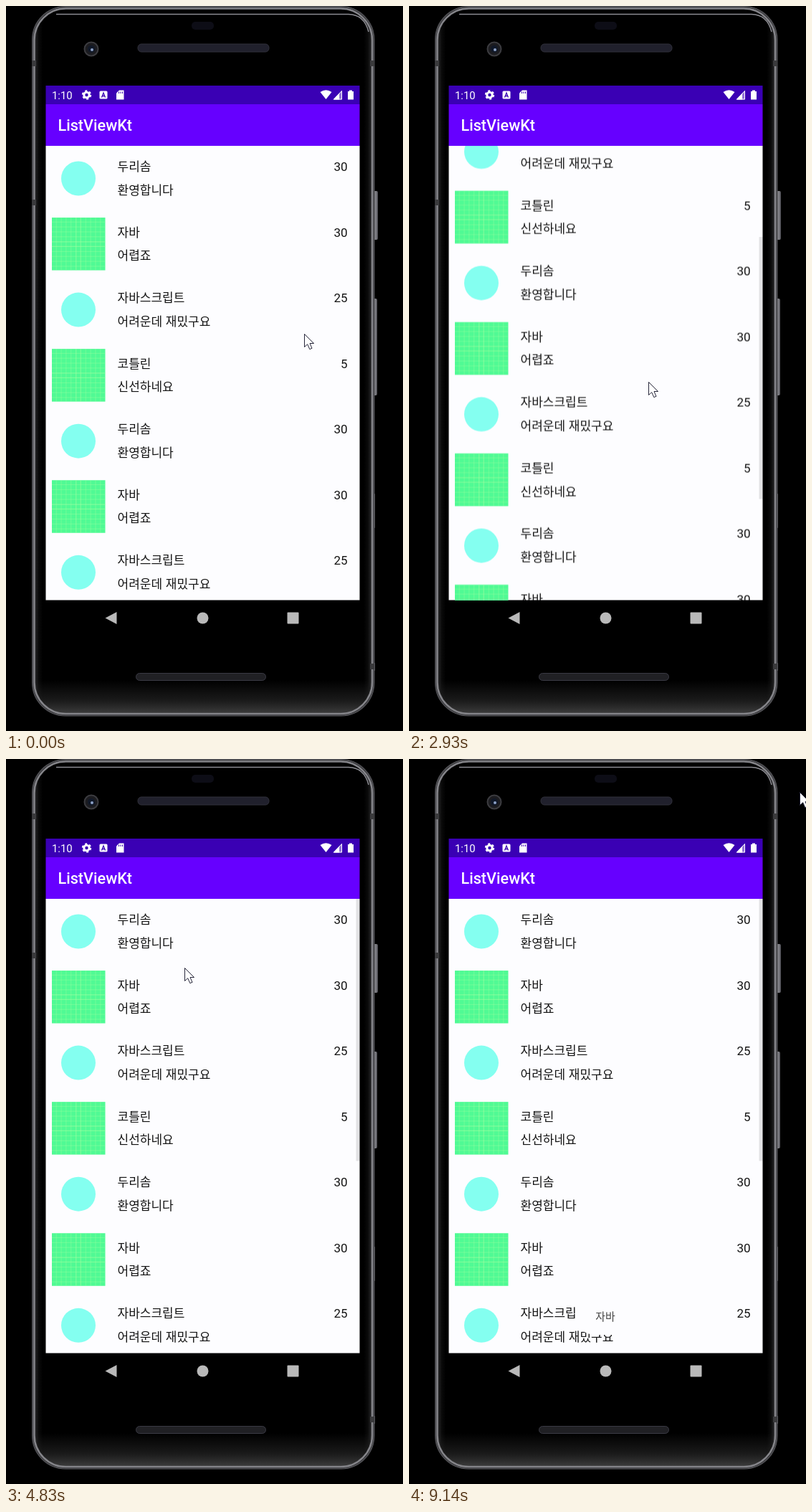
Write an HTML page that moves like this. It is 554 px wide and 1011 px high and loops after 9.27 s.

```html
<!DOCTYPE html>
<html lang="ko">
<head>
<meta charset="utf-8">
<title>ListViewKt</title>
<style>
html, body { margin: 0; width: 100%; height: 100%; overflow: hidden; background: #000; }
svg { display: block; width: 100vw; height: 100vh; }
text { font-family: Roboto, "Noto Sans CJK KR", "Noto Sans CJK", sans-serif; font-size: 17px; fill: #141414; }
.ko { font-family: "Noto Sans CJK KR", "Noto Sans CJK", sans-serif; }
.num { text-anchor: end; }
.title { font-size: 21.6px; font-weight: 500; fill: #fff; }
.clock { font-size: 14.9px; fill: #fff; }
.toast text { font-size: 14.9px; fill: #444; text-anchor: middle; }
.toast rect { fill: #fdfdff; }

#list, #thumb, #bar, #glow, #cursor, .toast { animation: 9270ms linear infinite; }
#list { animation-name: scroll; }
#thumb { animation-name: thumb; }
#bar { animation-name: bar; }
#glow { animation-name: glow; }
#cursor { animation-name: cursor; }
#toast1 { animation-name: toast1; }
#toast2 { animation-name: toast2; }

@keyframes scroll {
  0%, 26.43% { transform: translateY(0); animation-timing-function: ease-in; }
  31.61% { transform: translateY(-220px); animation-timing-function: ease-out; }
  38.83%, 42.61% { transform: translateY(-465px); animation-timing-function: ease-in-out; }
  50.16%, 100% { transform: translateY(0); }
}
@keyframes thumb {
  0%, 26.43% { transform: translateY(0); animation-timing-function: ease-in; }
  31.61% { transform: translateY(126.8px); animation-timing-function: ease-out; }
  38.83%, 42.61% { transform: translateY(268px); animation-timing-function: ease-in-out; }
  50.16%, 100% { transform: translateY(0); }
}
@keyframes bar {
  0%, 26.43% { opacity: 0; }
  27%, 100% { opacity: 1; }
}
@keyframes glow {
  0%, 38.3% { opacity: 0; }
  39.91%, 41.6% { opacity: 1; }
  43.15%, 100% { opacity: 0; }
}
@keyframes toast1 {
  0%, 57.61% { opacity: 0; }
  60.41%, 79.83% { opacity: 1; }
  81.98%, 100% { opacity: 0; }
}
@keyframes toast2 {
  0%, 82.74% { opacity: 0; }
  85.22%, 100% { opacity: 1; }
}
@keyframes cursor {
  0%, .32% { transform: translate(416px, 457px); }
  10.03% { transform: translate(345px, 473px); }
  18.02%, 20.5% { transform: translate(324px, 476px); }
  30%, 31.9% { transform: translate(334px, 524px); }
  40.5%, 41.6% { transform: translate(274px, 375.5px); }
  51.8%, 52.3% { transform: translate(249px, 291px); }
  55.77%, 57.61% { transform: translate(248px, 262px); }
  66.24%, 92.4% { transform: translate(275px, 332px); }
  93.53%, 95.69% { transform: translate(296px, 398px); animation-timing-function: ease-in; }
  98.6%, 100% { transform: translate(545px, 46px); }
}
</style>
</head>
<body>
<svg viewBox="0 0 554 1011" preserveAspectRatio="none">
  <defs>
    <linearGradient id="side" x1="0" x2="1" y1="0" y2="0">
      <stop offset="0" stop-color="#3a3a3c"/>
      <stop offset=".018" stop-color="#0a0a0a"/>
      <stop offset=".03" stop-color="#000"/>
      <stop offset=".97" stop-color="#000"/>
      <stop offset=".982" stop-color="#0a0a0a"/>
      <stop offset="1" stop-color="#3a3a3c"/>
    </linearGradient>
    <linearGradient id="chin" x1="0" x2="0" y1="0" y2="1">
      <stop offset="0" stop-color="#2a2a2a" stop-opacity="0"/>
      <stop offset=".6" stop-color="#2a2a2a" stop-opacity=".6"/>
      <stop offset="1" stop-color="#3c3c3c"/>
    </linearGradient>
    <linearGradient id="key" x1="0" x2="1" y1="0" y2="0">
      <stop offset="0" stop-color="#2a2a2e"/>
      <stop offset=".6" stop-color="#8a8a90"/>
      <stop offset="1" stop-color="#4a4a50"/>
    </linearGradient>
    <clipPath id="view"><rect x="55.5" y="195" width="438" height="633.5"/></clipPath>
    <g id="tile">
      <rect x="64" y="8.5" width="74.5" height="73.5" fill="#50fa94"/>
      <path id="grid" fill="none" stroke="#a8ffa0" stroke-opacity=".35"/>
    </g>
    <circle id="dot" cx="101" cy="45.5" r="24" fill="#84fff0"/>
  </defs>

  <rect width="554" height="1011" fill="#000"/>

  <!-- phone body -->
  <g fill="url(#key)">
    <rect x="511" y="258" width="8" height="68" rx="2"/>
    <rect x="511" y="408" width="7" height="135" rx="2"/>
    <rect x="511" y="680" width="4" height="48" rx="1"/>
    <rect x="511" y="916" width="4" height="11" rx="1"/>
  </g>
  <rect x="37" y="1" width="476.500" height="988.500" rx="46" fill="url(#side)" stroke="#4e4e52" stroke-width="2"/>
  <path d="M41 940H509V946Q509 986 466 986H84Q41 986 41 946z" fill="url(#chin)"/>
  <rect x="39.500" y="3.500" width="471.500" height="983.500" rx="44" fill="none" stroke="#85858a" stroke-width="2.500"/>
  <path d="M70 11.500H478Q500 12 506 36" fill="none" stroke="#8c8c92" stroke-width="1.500"/>
  <path d="M36 80h6M36 274h6M508 80h6M508 921h6" stroke="#3a3a3c" stroke-width="8"/>
  <rect x="184" y="53" width="183" height="11" rx="5" fill="#20202c" stroke="#30303a"/>
  <rect x="181.500" y="930.500" width="181" height="10" rx="5" fill="#202024" stroke="#3a3a44"/>
  <rect x="259" y="22" width="31" height="11" rx="5" fill="#0d0d16"/>
  <circle cx="119" cy="60" r="9.500" fill="#1c1c20" stroke="#3c3c40" stroke-width="2"/>
  <circle cx="119" cy="60" r="5" fill="#101828"/>
  <circle cx="120" cy="61" r="2" fill="#8ea2c8"/>

  <!-- app -->
  <rect x="55.500" y="111" width="438" height="26" fill="#3a00b4"/>
  <rect x="55.500" y="137" width="438" height="58" fill="#6600ff"/>
  <text class="clock" x="64" y="129.500">1:10</text>
  <g fill="#fff">
    <circle cx="112.500" cy="124" r="3.700" fill="none" stroke="#fff" stroke-width="3"/>
    <circle cx="112.500" cy="124" r="5.700" fill="none" stroke="#fff" stroke-width="2" stroke-dasharray="3 2.970"/>
    <rect x="130.500" y="118.500" width="11" height="11" rx="1.500"/>
    <path d="M133.500 127.500l2.500-6.500 2.500 6.500M134.500 125.500h3" fill="none" stroke="#3a00b4" stroke-width="1.300"/>
    <path d="M158 117.500h6.500v13h-10.500v-9z"/>
    <path d="M157.500 119.500v2.500M160 119.500v2.500M162.500 119.500v2.500" stroke="#3a00b4"/>
    <path d="M438.500 120Q446.500 114.500 454.500 120L446.500 130z"/>
    <path d="M456.500 130.500L469 117.500V130.500z" fill-opacity=".45"/>
    <path d="M456.500 130.500L465 121.700V130.500z"/>
    <path d="M468.500 118.500V130H458z" fill="none" stroke="#fff"/>
    <path d="M477 119h2v-1.500h4V119h2v11.500h-8z"/>
  </g>
  <text class="title" x="72.500" y="174">ListViewKt</text>

  <g clip-path="url(#view)">
    <rect x="55" y="195" width="439" height="634" fill="#fdfdff"/>
    <g id="list"></g>
    <g id="bar"><rect id="thumb" x="488.500" y="195" width="5" height="365.500" fill="#000" fill-opacity=".1"/></g>
    <circle id="glow" cx="274" cy="1482" r="710" fill="#a000f0" fill-opacity=".045"/>
    <g id="toast1" class="toast">
      <rect x="227" y="751" width="94" height="52" rx="26"/>
      <text class="ko" x="274" y="782.500">두리솜</text>
    </g>
    <g id="toast2" class="toast">
      <rect x="233" y="751" width="82" height="52" rx="26"/>
      <text class="ko" x="274" y="782.500">자바</text>
    </g>
  </g>

  <g fill="#b9b9b9">
    <path d="M138.500 853.500L154.500 845V862z"/>
    <circle cx="274.500" cy="853.500" r="8"/>
    <rect x="392.500" y="845.500" width="16" height="16" rx="1"/>
  </g>

  <path id="cursor" d="M.5.5V18.500L4.700 14.700 7.800 21.700 11 20.300 8 13.500H13.500z" fill="#fff" stroke="#26263a" stroke-linejoin="round"/>
</svg>
<script>
const people = [
  ["두리솜", "환영합니다", 30],
  ["자바", "어렵죠", 30],
  ["자바스크립트", "어려운데 재밌구요", 25],
  ["코틀린", "신선하네요", 5]
];
const pitch = 91.55;

const row = (i) => {
  const [name, note, age] = people[i % people.length];
  return `<g transform="translate(0 ${(195 + i * pitch).toFixed(2)})">
    <use href="#${i % 2 ? "tile" : "dot"}"/>
    <text class="ko" x="155.5" y="35">${name}</text>
    <text class="ko" x="155.5" y="67.7">${note}</text>
    <text class="num" x="476.5" y="35">${age}</text>
  </g>`;
};
document.getElementById("list").innerHTML = Array.from({ length: 12 }, (_, i) => row(i)).join("");

// evenly spaced lines, with a denser cross in the middle
const cross = (d) => `M${64 + d} 8.5v73.5M64 ${8.5 + d}h74.5`;
const lines = Array.from({ length: 10 }, (_, k) => 6.2 + k * 6.85);
document.getElementById("grid").setAttribute("d", [...lines, 34, 40].map(cross).join(""));
</script>
</body>
</html>
```
